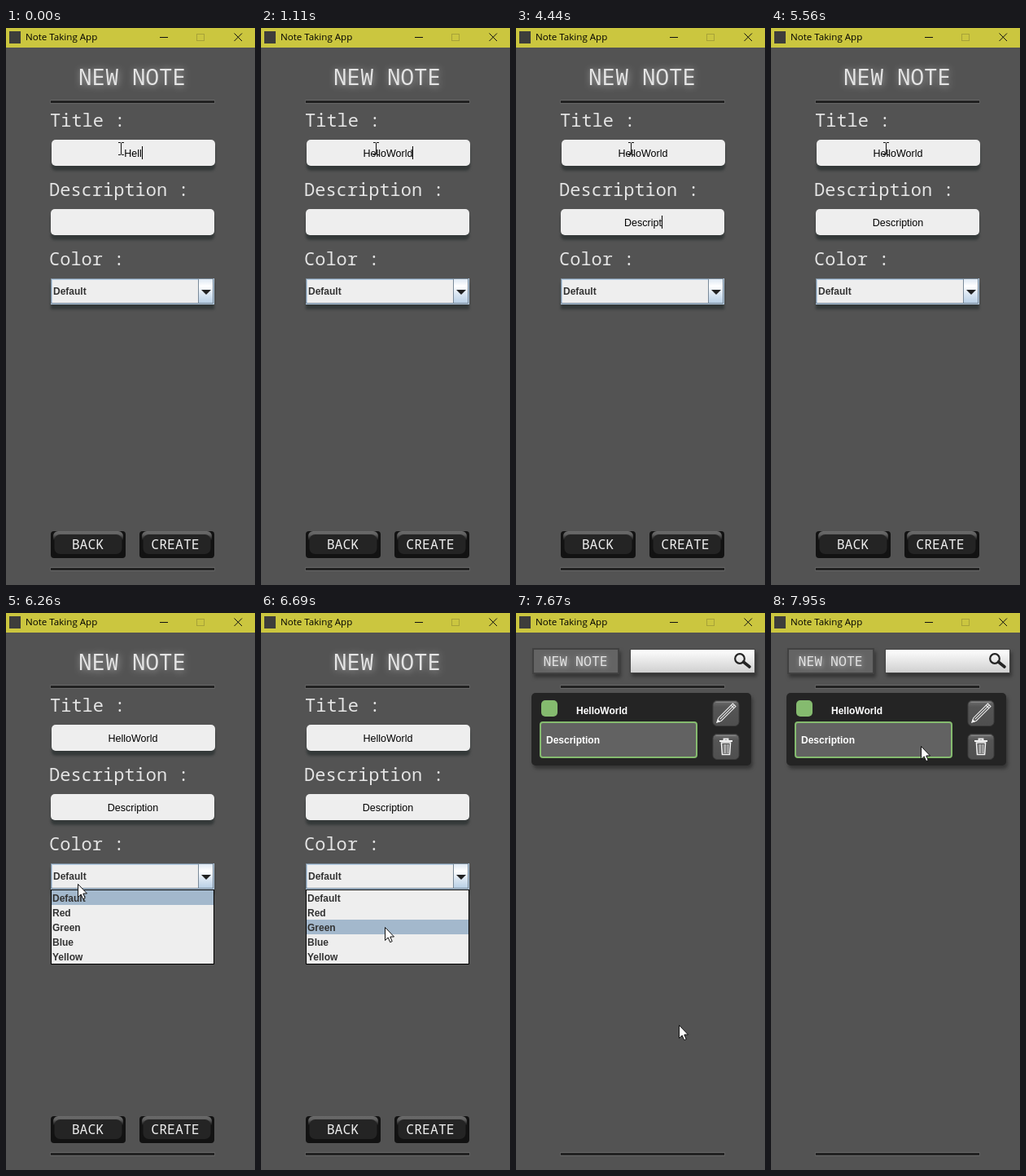
An HTML page that plays this animation: 306 by 683 pixels, repeating every 8000 ms.

```html
<!DOCTYPE html>
<html lang="en">
<head>
<meta charset="utf-8">
<title>Note Taking App</title>
<style>
  html, body { margin: 0; width: 100%; height: 100%; overflow: hidden; background: #535353; }
  svg { display: block; width: 306px; height: 683px; }
  text { white-space: pre; }
  .bar { font: 11.6px "Open Sans", "Noto Sans", sans-serif; }
  .mono { font-family: "Noto Sans Mono", "DejaVu Sans Mono", monospace; fill: #e4e4e4; }
  .head { font-size: 27.5px; filter: drop-shadow(1px 1px 4px rgba(255, 255, 255, .5)); }
  .label { font-size: 22px; font-weight: 500; }
  .btn { font-size: 16.5px; font-weight: 500; text-anchor: middle; fill: #eee; }
  .new { font-size: 16.5px; filter: drop-shadow(1px 1px 3px rgba(255, 255, 255, .6)); }
  .typed { font: 12.5px "Liberation Sans", Arial, sans-serif; text-anchor: middle; }
  .bold { font: bold 12px "Liberation Sans", Arial, sans-serif; fill: #333; }
  .white { fill: #fff; }
  .field { fill: #eee; }
  .drop { filter: drop-shadow(0 6px 1.5px rgba(45, 51, 51, .8)); }
  .soft { filter: drop-shadow(2px 4px 2px rgba(40, 40, 40, .7)); }
</style>
</head>
<body>
<svg viewBox="0 0 306 683" xmlns="http://www.w3.org/2000/svg">
  <defs>
    <linearGradient id="metal" x2="0" y2="1">
      <stop offset="0" stop-color="#dde8f3"/><stop offset=".3" stop-color="#fff"/>
      <stop offset=".6" stop-color="#dde8f3"/><stop offset="1" stop-color="#b8cfe5"/>
    </linearGradient>
    <linearGradient id="search" x2="0" y2="1">
      <stop offset="0" stop-color="#fff"/><stop offset="1" stop-color="#cfcfcf"/>
    </linearGradient>
    <linearGradient id="tile" x2="0" y2="1">
      <stop offset="0" stop-color="#6e6e6e"/><stop offset=".25" stop-color="#555"/><stop offset="1" stop-color="#4f4f4f"/>
    </linearGradient>
    <linearGradient id="edge" x2="0" y2="1">
      <stop offset="0" stop-color="#6c6c6c"/><stop offset=".15" stop-color="#606060"/><stop offset=".4" stop-color="#121212"/>
    </linearGradient>
    <g id="rule">
      <rect width="202" height="5" x="-.5" y="-1" fill="#686868"/>
      <rect width="201" height="3" fill="#212121"/>
    </g>
    <g id="bevel">
      <rect width="92" height="33" rx="4" fill="#121212"/>
      <rect x="3" width="86" height="28" rx="6" fill="url(#edge)"/>
      <rect x="4.500" y="4" width="83" height="24" rx="7" fill="#242424"/>
    </g>
    <g id="key">
      <rect x=".5" y=".5" width="32" height="31" rx="5" fill="url(#tile)" stroke="#3c3c3c"/>
      <path d="M4 2.5H29" stroke="#858585"/>
    </g>
  </defs>

  <rect width="306" height="683" fill="#535353"/>
  <rect width="306" height="24" fill="#cbc63f"/>
  <rect x="4" y="4" width="14" height="15" fill="#3d3d3b"/>
  <text class="bar" x="24" y="15">Note Taking App</text>
  <path d="M189 11.5h10M280.5 6.5l9.5 9.5m0-9.5l-9.5 9.5" fill="none" stroke="#111"/>
  <rect x="234.5" y="7.5" width="9" height="8" fill="none" stroke="#a7a238"/>
  <use href="#rule" x="55" y="89"/>
  <use href="#rule" x="55" y="662"/>

  <g id="form">
    <text class="mono head" x="89" y="70">NEW NOTE</text>
    <text class="mono label" x="54" y="121">Title :</text>
    <text class="mono label" x="53" y="206">Description :</text>
    <text class="mono label" x="53" y="291">Color :</text>
    <rect class="field drop" x="56" y="137" width="201" height="32" rx="5"/>
    <rect class="field drop" x="55" y="222" width="201" height="32" rx="5"/>
    <text class="typed" id="title" x="156" y="158"></text>
    <text class="typed" id="desc" x="156" y="243"></text>
    <rect id="caret" width="1" height="16"/>

    <rect class="drop" x="55" y="307" width="201" height="32" fill="#b8cfe5"/>
    <rect id="combo" x="55.5" y="307.5" width="199" height="30" stroke="#7a8a99"/>
    <path d="M56.5 337V308.5H254" fill="none" stroke="#b8cfe5"/>
    <rect x="236.5" y="307.5" width="18" height="30" fill="url(#metal)" stroke="#7a8a99"/>
    <path d="M240 321H252L246 327Z" fill="#222"/>
    <text class="bold" id="choice" x="58" y="327"></text>

    <g id="popup">
      <rect x="55.5" y="339.5" width="200" height="91" fill="#eee" stroke="#000"/>
      <rect id="mark" x="56" width="199" height="18" fill="#a3b8cc"/>
    </g>

    <use href="#bevel" x="55" y="617"/>
    <use href="#bevel" x="164" y="617"/>
    <text class="mono btn" x="100.5" y="639">BACK</text>
    <text class="mono btn" x="208" y="639">CREATE</text>
  </g>

  <g id="notes">
    <rect class="soft" x="21" y="44" width="105" height="30" fill="#646464" stroke="#414141" stroke-width="2"/>
    <text class="mono new" x="33.5" y="64.5">NEW NOTE</text>
    <rect class="soft" x="140.5" y="44.5" width="153" height="29" fill="url(#search)" stroke="#444"/>
    <g fill="none" stroke="#252525">
      <circle cx="275" cy="56" r="5.8" stroke-width="2.2"/>
      <path d="M279.5 60L287 66" stroke-width="3.6" stroke-linecap="round"/>
    </g>

    <rect class="soft" x="19" y="98" width="270" height="89" rx="5" fill="#242424"/>
    <rect x="31" y="107" width="20" height="20" rx="5" fill="#85bb6f"/>
    <text class="bold white" x="74" y="124">HelloWorld</text>
    <rect x="30" y="134" width="192" height="43" rx="3" fill="#626262" stroke="#85bb6f" stroke-width="2"/>
    <text class="bold white" x="37" y="160">Description</text>

    <use href="#key" x="241.5" y="107"/>
    <g transform="translate(247 134) rotate(-45)" fill="none" stroke="#eee">
      <path d="M0 0L5 -2.5H30V2.5H5ZM5 0H30M27 -2.5V2.5" stroke-width="1.1"/>
      <path d="M0 0L3 -1.5V1.5Z" fill="#eee"/>
    </g>
    <use href="#key" x="241.5" y="148"/>
    <g fill="none" stroke="#f2f2f2">
      <path d="M250 157H266M255.5 156V154.5H260.5V156" stroke-width="1.8"/>
      <path d="M252.5 159L253.5 173.5H262.5L263.5 159Z" stroke-width="1.6"/>
      <path d="M256 161V172M258 161V172M260.5 161V172"/>
    </g>
  </g>

  <path id="beam" d="M-3 -7.5H0M1 -7.5H4M.5 -7V7M-3 7.5H0M1 7.5H4" fill="none" stroke="#111"/>
  <path id="arrow" d="M.5 .5V16.5L4.2 13L6.7 18.7L9.2 17.6L6.8 12H11.5Z" fill="#fff" stroke="#111"/>
</svg>
<script>
  const LOOP = 8000;
  const NOTES_AT = 7530;
  const $ = id => document.getElementById(id);
  const show = (id, on) => { $(id).style.display = on ? '' : 'none'; };

  const colors = ['Default', 'Red', 'Green', 'Blue', 'Yellow'];
  // [time, letters typed]
  const titleKeys = [[0, 4], [130, 5], [560, 6], [840, 7], [970, 9], [1110, 10]];
  const descKeys = [[0, 0], [2230, 1], [2510, 2], [2660, 3], [2930, 5], [3060, 6], [3330, 7],
    [3480, 8], [4720, 9], [4850, 10], [5130, 11]];
  // [time, field holding the caret]
  const carets = [[0, 'title'], [1670, ''], [1800, 'desc'], [3890, ''], [4440, 'desc'], [5560, '']];
  // [time, chosen, hovered item or -1 when closed]
  const combo = [[0, 0, -1], [6260, 0, 0], [6400, 0, 2], [6970, 2, -1]];

  // Pointer moves: [start, end, x, y], seen only at the screen's refresh
  const home = [141, 148];
  const moves = [[5556, 6110, 88, 332], [6258, 6530, 156, 389], [6540, 6680, 152, 385],
    [6970, 7380, 206, 628], [7523, 7940, 184, 163]];
  const REFRESH = 140.5, PHASE = 5556;

  const at = (steps, t) => steps.findLast(s => s[0] <= t);

  function pointer(t) {
    const seen = PHASE + Math.floor((t - PHASE) / REFRESH) * REFRESH;
    let [x, y] = home;
    for (const [start, end, toX, toY] of moves) {
      const p = Math.min(1, Math.max(0, (seen - start) / (end - start)));
      const e = p * p * (3 - 2 * p);
      x += (toX - x) * e;
      y += (toY - y) * e;
    }
    return [Math.round(x), Math.round(y)];
  }

  const overField = y => (y >= 137 && y < 169) || (y >= 222 && y < 254);

  colors.forEach((name, i) => {
    const item = document.createElementNS('http://www.w3.org/2000/svg', 'text');
    item.setAttribute('class', 'bold');
    item.setAttribute('x', 57);
    item.setAttribute('y', 354 + i * 18);
    item.textContent = name;
    $('popup').append(item);
  });

  function draw(t) {
    const form = t < NOTES_AT;
    show('form', form);
    show('notes', !form);

    $('title').textContent = 'HelloWorld'.slice(0, at(titleKeys, t)[1]);
    $('desc').textContent = 'Description'.slice(0, at(descKeys, t)[1]);

    const focus = at(carets, t)[1];
    show('caret', focus);
    if (focus) {
      $('caret').setAttribute('x', Math.round(156 + $(focus).getComputedTextLength() / 2));
      $('caret').setAttribute('y', focus === 'title' ? 145 : 230);
    }

    const [, chosen, hover] = at(combo, t);
    $('choice').textContent = colors[chosen];
    $('combo').setAttribute('fill', chosen ? '#a3b8cc' : '#eee');
    show('popup', hover >= 0);
    $('mark').setAttribute('y', 340 + Math.max(hover, 0) * 18);

    const [x, y] = pointer(t);
    const shape = form && overField(y) ? 'beam' : 'arrow';
    for (const id of ['beam', 'arrow']) {
      show(id, id === shape);
      $(id).setAttribute('transform', `translate(${x} ${y})`);
    }
  }

  function tick() {
    draw(performance.now() % LOOP);
    requestAnimationFrame(tick);
  }
  tick();
</script>
</body>
</html>
```
